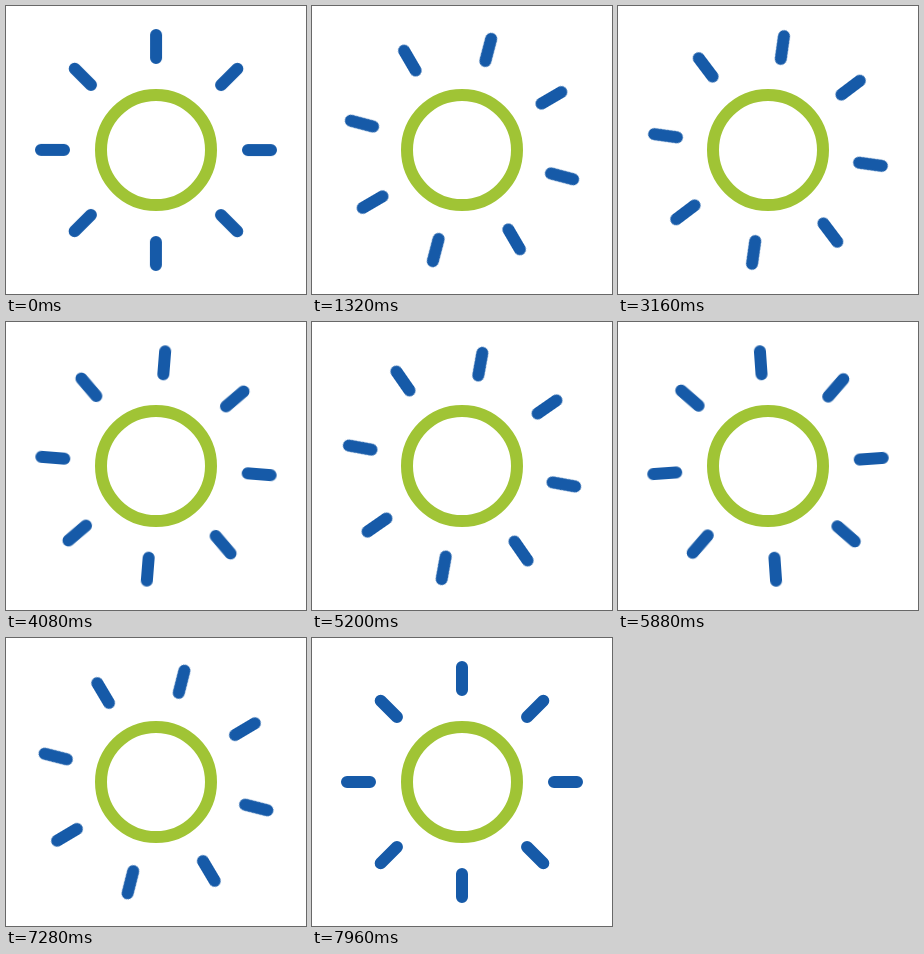
Animation, 300 px wide and 288 px high, one loop 8 s. Source, as an HTML page:

```html
<!DOCTYPE html>
<html lang="en">
<head>
<meta charset="utf-8">
<title>Sun</title>
<style>
  html, body { margin: 0; width: 100%; height: 100%; overflow: hidden; background: #fff; }
  svg { display: block; width: 100%; height: 100%; }
  .disc { fill: none; stroke: #a0c435; stroke-width: 12; }
  .rays { stroke: #165aa8; stroke-width: 12; stroke-linecap: round; animation: spin 8s linear infinite; }

  /* One full turn, then a short rest before the loop restarts */
  @keyframes spin {
    0% { transform: rotate(0deg); }
    99.5%, 100% { transform: rotate(360deg); }
  }
</style>
</head>
<body>
<svg viewBox="0 0 300 288">
  <defs>
    <path id="pair" d="M0-115V-92M0 92V115"/>
  </defs>
  <g transform="translate(150 144)">
    <circle class="disc" r="55"/>
    <g class="rays">
      <use href="#pair"/>
      <use href="#pair" transform="rotate(45)"/>
      <use href="#pair" transform="rotate(90)"/>
      <use href="#pair" transform="rotate(135)"/>
    </g>
  </g>
</svg>
</body>
</html>
```
